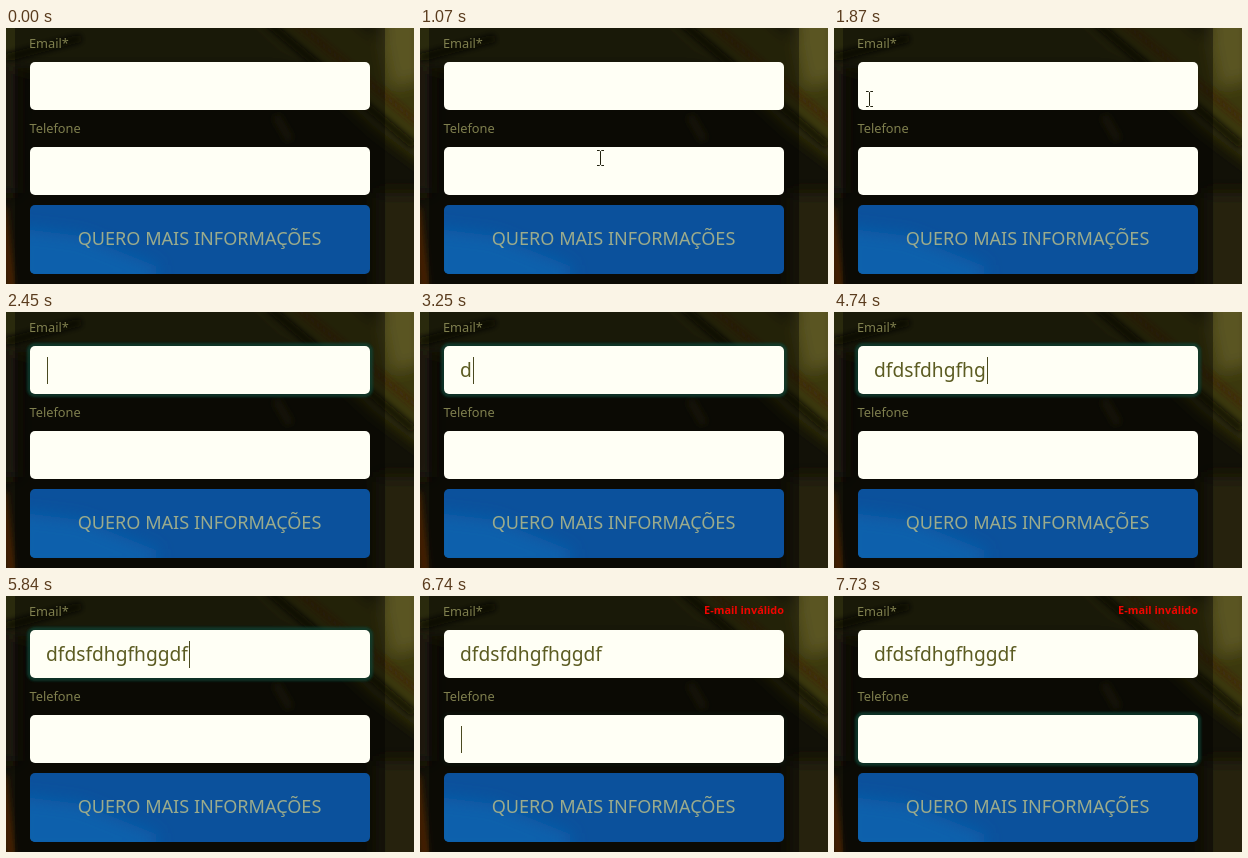
An HTML page that plays this animation: 408x256 px, repeating every 8 s.

```html
<!DOCTYPE html>
<html lang="pt">
<head>
<meta charset="utf-8">
<style>
html, body { margin: 0; width: 100%; height: 100%; overflow: hidden; background: #0b0b04; }
svg { display: block; width: 408px; height: 256px; font-family: "Noto Sans", "Open Sans", sans-serif; }
.label { font-size: 12.8px; fill: #7f7f4e; }
.typed { font-size: 19.2px; fill: #5c5c22; }
.field { fill: #fffff5; }
.glow { fill: none; stroke: #0a4234; stroke-width: 4; filter: url(#soft1); }
.caret { stroke: #4a4a20; stroke-width: 1; }
</style>
</head>
<body>
<svg viewBox="0 0 408 256">
  <defs>
    <filter id="soft1" x="-10%" y="-30%" width="120%" height="160%"><feGaussianBlur stdDeviation="1.2"/></filter>
    <filter id="soft3" x="-50%" y="-50%" width="200%" height="200%"><feGaussianBlur stdDeviation="3"/></filter>
    <filter id="soft8" x="-50%" y="-50%" width="200%" height="200%"><feGaussianBlur stdDeviation="8"/></filter>
    <clipPath id="btn"><rect x="24" y="177" width="340" height="69" rx="5"/></clipPath>
  </defs>

  <rect width="408" height="256" fill="#121107"/>
  <g filter="url(#soft8)">
    <path d="M-20-20H250L300 40H-20Z" fill="#2a2908"/>
    <path d="M240-20H340L430 60V145L370 100Z" fill="#3a370b"/>
    <path d="M370-20H420V50L385 60Z" fill="#5a5520"/>
    <path d="M370 165H430V280H370Z" fill="#26240b"/>
    <path d="M-20 30H12V165H-20Z" fill="#1a190a"/>
  </g>
  <g filter="url(#soft3)" fill="none">
    <path d="M262-5L408 118" stroke="#0c0a04" stroke-width="7"/>
    <path d="M290-5L412 95" stroke="#42200a" stroke-width="4"/>
    <path d="M270 88L284 112" stroke="#26240a" stroke-width="8"/>
    <path d="M0 30L75 10" stroke="#0c0b04" stroke-width="8"/>
    <path d="M-4 180L5 262" stroke="#4a2206" stroke-width="9"/>
  </g>
  <rect x="9" width="370" height="256" fill="#000" opacity=".4"/>

  <text class="label" x="23" y="20">Email*</text>
  <text class="label" x="23.5" y="105">Telefone</text>
  <text id="error" x="364" y="18" text-anchor="end" font-size="10.9" font-weight="700" fill="#f00500">E-mail inválido</text>

  <rect id="glow1" class="glow" x="23" y="33" width="342" height="50" rx="6"/>
  <rect id="glow2" class="glow" x="23" y="118" width="342" height="50" rx="6"/>
  <rect class="field" x="24" y="34" width="340" height="48" rx="5"/>
  <rect class="field" x="24" y="119" width="340" height="48" rx="5"/>
  <text id="typed" class="typed" x="40" y="65"></text>
  <path id="caret" class="caret"/>

  <g clip-path="url(#btn)">
    <rect x="24" y="177" width="340" height="69" fill="#0b519c"/>
    <path d="M10 200L75 208L150 238V260H10Z" fill="#0b61ac" filter="url(#soft8)"/>
  </g>
  <text x="193.5" y="217" text-anchor="middle" font-size="18.1" fill="#9bab8c">QUERO MAIS INFORMAÇÕES</text>

  <g id="mouse">
    <path id="beam" d="M-3.5-7.5H-1L0-6.5L1-7.5H3.5M0-6.5V6.5M-3.5 7.5H-1L0 6.5L1 7.5H3.5" fill="none" stroke="#222210"/>
    <path id="arrow" d="M0 0V16L3.7 12.6L6.2 18.3L8.6 17.2L6.1 11.7H11Z" fill="#fffff1" stroke="#111108" stroke-width=".9"/>
    <path id="hand" d="M-1.5 0Q0-1.5 1.5 0V6L8 7.5Q10 8 10 10V14L8 19H0L-5 12Q-5 9-1.5 11Z" fill="#fffff1" stroke="#111108" stroke-width=".9"/>
  </g>
</svg>
<script>
const LOOP = 8000;
const FOCUS = 2050, BLUR = 6600;
const WORD = "dfdsfdhgfhggdf";
const KEYS = [3250, 3420, 3560, 3700, 3850, 4020, 4130, 4230, 4400, 4560, 4720, 4900, 5080, 5440];
// time, x, y
const PATH = [
  [20, 406, 254], [830, 234, 150], [1630, -14, 58],
  [1730, -2, 102], [1870, 35, 71], [2050, 37, 63], [2350, 37, 63]
];

const el = id => document.getElementById(id);
const show = (id, on) => el(id).setAttribute("visibility", on ? "visible" : "hidden");
const clamp = v => Math.max(0, Math.min(1, v));
const ease = v => v * v * (3 - 2 * v);
const ramp = (t, from, to) => ease(clamp((t - from) / (to - from)));

function mouseAt(t) {
  const i = PATH.findIndex(p => p[0] > t);
  if (i < 1) return null;
  const a = PATH[i - 1], b = PATH[i];
  const k = ramp(t, a[0], b[0]);
  return [a[1] + (b[1] - a[1]) * k, a[2] + (b[2] - a[2]) * k];
}

function drawMouse(t) {
  const p = mouseAt(t);
  let kind = "";
  if (p) {
    const [x, y] = p;
    const inside = x > 24 && x < 364;
    const inField = inside && (y > 34 && y < 82 || y > 119 && y < 167);
    const inButton = inside && y > 177 && y < 246;
    kind = inField ? "beam" : inButton ? "hand" : "arrow";
    el("mouse").setAttribute("transform", `translate(${Math.round(x) + .5} ${Math.round(y)})`);
  }
  for (const id of ["beam", "arrow", "hand"]) show(id, id === kind);
}

function drawForm(t) {
  const count = KEYS.filter(k => k <= t).length;
  const typed = el("typed");
  const text = WORD.slice(0, count);
  if (typed.textContent !== text) typed.textContent = text;

  el("glow1").setAttribute("opacity", .75 * ramp(t, FOCUS, FOCUS + 150) * (1 - ramp(t, BLUR, BLUR + 110)));
  el("glow2").setAttribute("opacity", .75 * ramp(t, 6710, 6840));
  show("error", t >= BLUR);

  const second = t >= BLUR;
  const last = count ? KEYS[count - 1] : FOCUS;
  const blinkOn = Math.floor((t - last) / 530) % 2 === 0;
  show("caret", second ? t < 7730 : t >= FOCUS && blinkOn);
  const width = second || !count ? 0 : typed.getComputedTextLength();
  const x = Math.round(41 + width) + .5;
  const y = second ? 130 : 45;
  el("caret").setAttribute("d", `M${x} ${y}v27`);
}

function frame(now) {
  const t = now % LOOP;
  drawForm(t);
  drawMouse(t);
  requestAnimationFrame(frame);
}
frame(0);
</script>
</body>
</html>
```
